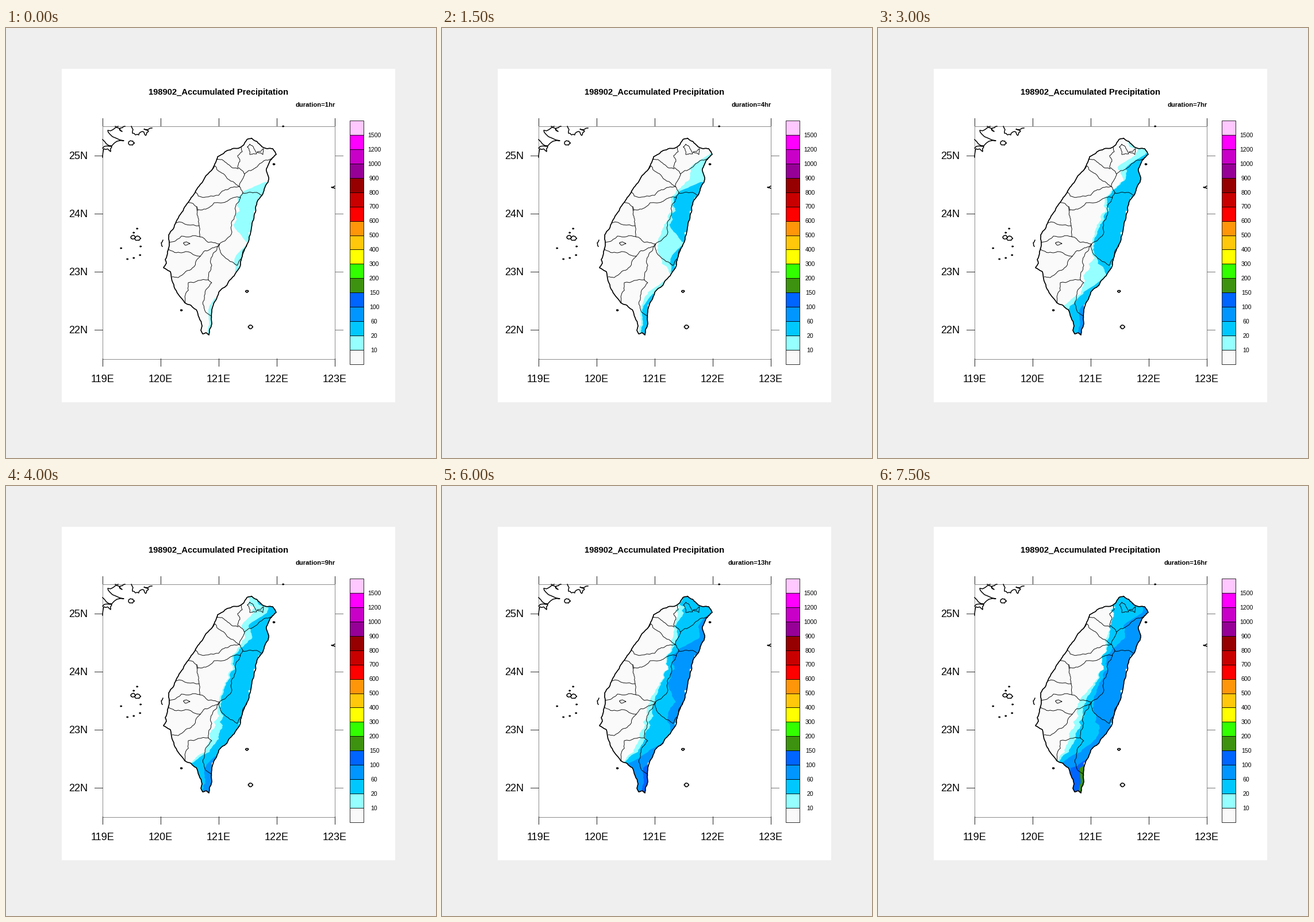
Animation, 748 px wide and 748 px high, one loop 8000 ms. Source, as a matplotlib script:

```python
import numpy as np
import matplotlib.pyplot as plt
from matplotlib.animation import FuncAnimation
from matplotlib.patches import Polygon, Rectangle

SIZE, FRAMES, PX = 748, 16, 0.72
rng = np.random.default_rng(4)

fig = plt.figure(figsize=(7.48, 7.48), dpi=100, facecolor="#efefef")
ax = fig.add_axes([0, 0, 1, 1])
ax.set(xlim=(0, SIZE), ylim=(SIZE, 0))
ax.axis("off")
ax.set_autoscale_on(False)


def text(x, y, s, size, ha="center", weight="normal"):
    return ax.text(x, y, s, fontsize=size * PX, ha=ha, va="baseline",
                   family="Liberation Sans", weight=weight, zorder=9)


def line(pts, width=1, color="black", z=6):
    x, y = np.transpose(pts)
    ax.plot(x, y, color=color, lw=width * PX, zorder=z,
            solid_joinstyle="round")


def box(x, y, w, h, color, edge="none", z=1):
    patch = Rectangle((x, y), w, h, fc=color, ec=edge, lw=0.8 * PX, zorder=z)
    ax.add_patch(patch)
    return patch


def rough(pts, amp, rounds=3):
    """Roughen a line by random midpoint displacement."""
    pts = np.array(pts, float)
    for _ in range(rounds):
        step = np.diff(pts, axis=0)
        normal = np.c_[-step[:, 1], step[:, 0]]
        mid = pts[:-1] + step / 2
        mid += normal * rng.uniform(-amp, amp, (len(step), 1))
        out = np.empty((2 * len(pts) - 1, 2))
        out[::2], out[1::2] = pts, mid
        pts = out
    return pts


# ---- panel, axes, colour bar ----
box(97, 71, 580, 580, "white")
text(370, 116.3, "198902_Accumulated Precipitation", 14.8, weight="bold")
label = text(573, 137, "", 11.2, "right", "bold")

line([(168, 170.5), (572, 170.5), (572, 575.5), (168, 575.5), (168, 170.5)],
     1, "#8c8c8c")
for i in range(5):
    x = 168 + 101 * i
    line([(x, 157), (x, 170)], 1, "#222222")
    line([(x, 575), (x, 588)], 1, "#222222")
    text(x, 615.8, f"{119 + i}E", 18)
for i in range(4):
    y = 221.5 + 101.2 * i
    line([(154, y), (168, y)], 1, "#333333")
    line([(572, y), (586, y)], 1, "#777777")
    text(142, y + 6.3, f"{25 - i}N", 18, "right")

SCALE = ["#fafafa", "#96ffff", "#00c8ff", "#0096ff", "#0064ff", "#3d920f",
         "#32ff00", "#ffff00", "#ffc80a", "#ff960a", "#ff0000", "#c80000",
         "#960000", "#960096", "#c800c8", "#ff00ff", "#ffc8ff"]
STEPS = [10, 20, 60, 100, 150, *range(200, 1000, 100), 1000, 1200, 1500]
STEPS = [s for s in STEPS if s not in (700, 800)] if len(STEPS) > 18 else STEPS
cell = (585 - 161) / len(SCALE)
for i, color in enumerate(SCALE):
    top = 585 - cell * (i + 1)
    box(598.5, top, 24, cell, color, "black", 2)
    if i < len(STEPS):
        text(640.5, top + 3.8, STEPS[i], 10.5)

# ---- coast ----
EAST = [(427, 192), (436, 197), (446, 207), (464, 210), (470, 220),
        (459, 231), (453, 245), (457, 260), (456, 268), (447, 288),
        (437, 302), (434, 320), (427, 347), (418, 380), (410, 400),
        (408, 412), (397, 431), (384, 448), (370, 460), (361, 480),
        (358, 491), (358, 515), (353, 534)]
WEST = [(353, 534), (348, 530), (342, 532), (339, 526), (341, 518),
        (331, 490), (311, 478), (294, 454), (286, 424), (274, 417),
        (279, 409), (277, 403), (284, 375), (283, 360), (296, 337),
        (311, 311), (322, 295), (338, 272), (360, 244), (368, 224),
        (385, 213), (407, 208), (413, 204), (419, 194), (427, 192)]
coast = rough(EAST + WEST[1:], 0.08)
land = Polygon(coast, fc=SCALE[0], ec="none", zorder=2)
ax.add_patch(land)
line(coast, 1.7, z=7)


def border(*pts):
    line(rough(pts, 0.14), 0.9)


def shore(*pts):
    line(rough(pts, 0.2, 2), 1.5)


def islet(x, y, r):
    a = np.linspace(0, 2 * np.pi, 7)
    shore(*np.c_[x + r * np.cos(a), y + 0.8 * r * np.sin(a)])


# ---- county borders, drawn between shared junctions ----
NORTH, MID, SOUTH = (415, 254), (412, 287), (371, 376)
FORK, PLAIN, HILL = (406, 276), (336, 344), (338, 397)
CAPE, INLET = (352, 438), (332, 311)

border((409, 208), (411, 215), (403, 222), (407, 232), (403, 243), NORTH,
       (407, 270), FORK, MID)
border((464, 225), (441, 236), (430, 246), NORTH)
border((420, 207), (424, 202), (436, 219), (424, 220), (420, 207))
border((437, 216), (448, 210), (447, 220), (437, 216))
border((366, 228), (376, 229), (389, 239), (404, 245))
border((358, 247), (364, 240), (383, 259), FORK)
border((330, 285), (334, 292), (370, 291), (390, 278), FORK)
border(MID, (432, 286), (445, 291))
border((317, 303), INLET, (333, 317), (355, 311), (362, 304), (408, 295))
border(MID, (402, 305), (399, 325), (393, 355), SOUTH)
border(INLET, (334, 330), PLAIN, (337, 363))
border((296, 339), PLAIN)
border((284, 373), (305, 362), (337, 363), (352, 373), SOUTH)
border((309, 374), (314, 372), (320, 375), (312, 378), (309, 374))
border((282, 384), (306, 391), (315, 389), HILL, (358, 383), SOUTH)
border((289, 433), (300, 434), (322, 420), HILL)
border((312, 478), (311, 468), (317, 443), CAPE)
border(SOUTH, (360, 393), (358, 413), CAPE, (358, 443), (345, 466),
       (347, 494), (358, 503))
border(SOUTH, (373, 390), (402, 413), (411, 394), (418, 378))

# ---- small islands and mainland corner ----
shore((168, 194), (184, 205), (205, 196), (180, 184), (177, 178), (195, 171))
shore((168, 209), (184, 206), (182, 215), (170, 210), (168, 225))
shore((190, 171), (202, 180), (198, 175), (207, 171))
shore((218, 171), (220, 183), (231, 186), (238, 180), (243, 187), (248, 179),
      (240, 176), (254, 174))
shore((273, 369), (270, 374), (272, 380))
shore((572, 275), (566, 277), (572, 279))
for x, y, r in [(218, 200, 5), (425, 520, 4), (419, 458, 2.5), (305, 491, 1.5),
                (466, 237, 1.5), (482, 171, 1), (221, 364, 4), (229, 366, 5)]:
    islet(x, y, r)
for x, y in [(228, 349), (222, 356), (200, 383), (211, 402), (222, 400),
             (233, 395), (234, 380)]:
    islet(x, y, 1)

# ---- rain: how far each depth has spread inland from the east shore ----
HOURS = [0, 1, 4, 7, 11, 16]
ROWS = [195, 215, 240, 265, 285, 315, 345, 375, 400, 430, 460, 485, 530]
SPREAD = [
    [0] * len(ROWS),
    [0, 0, 0, 0, 36, 32, 30, 0, 15, 0, 0, 6, 4],
    [0, 0, 22, 27, 41, 36, 40, 47, 33, 0, 14, 12, 12],
    [0, 15, 39, 30, 44, 42, 46, 50, 38, 40, 20, 39, 30],
    [18, 58, 52, 53, 49, 45, 46, 54, 50, 46, 34, 46, 40],
    [22, 61, 50, 61, 51, 46, 52, 74, 66, 65, 49, 50, 40],
]
# Hours by which each depth trails the 10 mm front; the cape fills faster
LAG = {10: 0, 20: 3, 60: 11, 100: 24, 150: 32}

ys = np.arange(192, 536, 2.0)
shore_x = np.interp(ys, *np.transpose(EAST)[::-1])
grid = np.array([np.interp(ys, ROWS, row) for row in SPREAD])
pace = np.interp(ys, [450, 490], [1, 0.45])
wobble = np.convolve(rng.normal(0, 4, len(ys)), np.ones(5) / 5, "same")

# Shore cells that hold no data
for x, y in rough(EAST[9:-2], 0)[4::11]:
    box(x - 3, y, 4, 4, "white", z=5).set_clip_path(land)


def spread(hour, mm):
    when = hour - LAG[mm] * pace
    return np.array([np.interp(t, HOURS, col) for t, col in zip(when, grid.T)])


shown = []


def draw(i):
    while shown:
        shown.pop().remove()
    hour = i + 1
    label.set_text(f"duration={hour}hr")
    for k, mm in enumerate(LAG):
        reach = spread(hour, mm)
        edge = shore_x - reach + wobble * np.clip(reach / 20, 0, 1)
        area = ax.fill_betweenx(ys, edge, 480, where=reach > 2, lw=0,
                                color=SCALE[k + 1], zorder=3 + k / 10)
        area.set_clip_path(land)
        shown.append(area)
    return [label, *shown]


anim = FuncAnimation(fig, draw, frames=FRAMES, init_func=lambda: draw(0),
                     interval=500, repeat=True, repeat_delay=0, blit=False)
plt.show()
```
